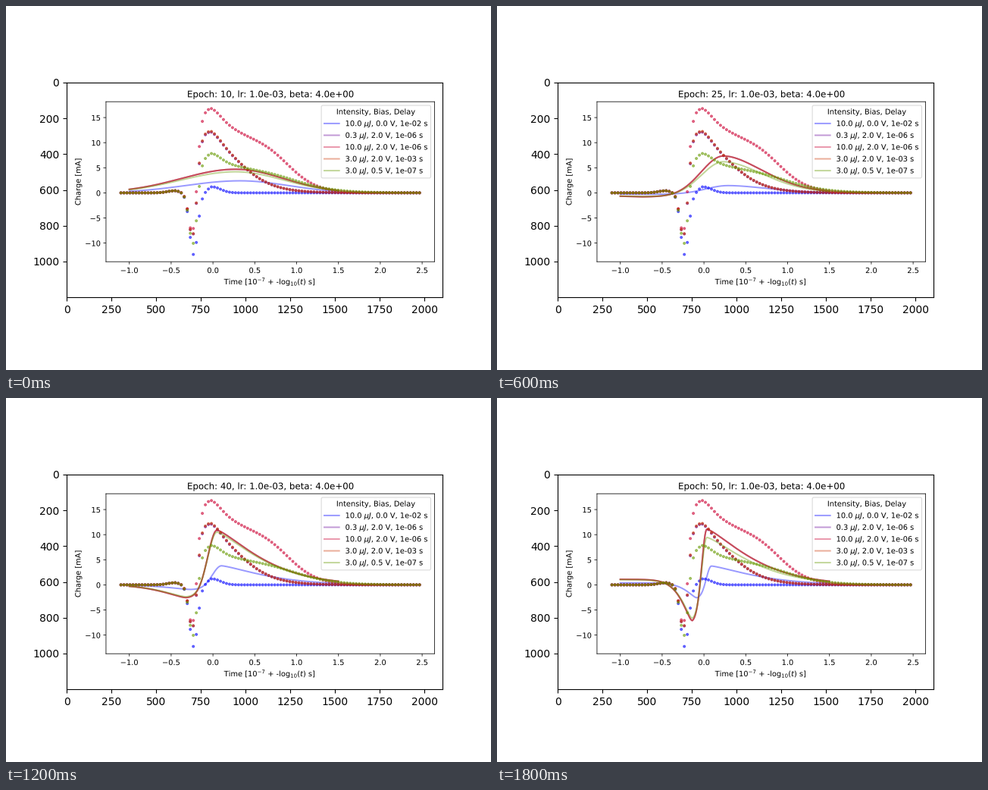
Animation, 640 px wide and 480 px high, one loop 2 s. Source, as a matplotlib script:

```python
import matplotlib.pyplot as plt
import numpy as np
from matplotlib.animation import FuncAnimation
from matplotlib.patches import FancyBboxPatch
from matplotlib.patheffects import Normal

W, H, DPI = 640, 480, 100
S = 496 / 700                 # scale of the embedded 7 x 4 inch plot
LEFT, RIGHT, TOP, BOTTOM = 131.95, 565.37, 126.2, 337.2
X0, PER_T = 273.1, 110.4      # stage pixels of t = 0 and per unit of t
Y0, PER_MA = 246.4, 6.62      # stage pixels of 0 mA and per mA
LINE = dict(alpha=.4, lw=2 * S)

COLORS = [(0, 0, 1), (.4, 0, .6), (.8, 0, .2), (.8, .2, 0), (.4, .6, 0)]
LABELS = [r"10.0 $\mu J$, 0.0 V, 1e-02 s", r"0.3 $\mu J$, 2.0 V, 1e-06 s",
          r"10.0 $\mu J$, 2.0 V, 1e-06 s", r"3.0 $\mu J$, 2.0 V, 1e-03 s",
          r"3.0 $\mu J$, 0.5 V, 1e-07 s"]


def hump(x, center, left, right):
    return np.exp(-.5 * ((x - center) / np.where(x < center, left, right)) ** 2)


def sigmoid(x):
    return 1 / (1 + np.exp(-x))


# Measured dots: a dip shared by all, then a decaying response.
N = np.arange(100)
DOT_X = np.linspace(LEFT + 19.7, RIGHT - 19.7, N.size)


def dots(shoulder=0, end=40, width=6, spike=0):
    common = (.42 * hump(N, 18, 2.5, 1.2) - 12.3 * hump(N, 24.1, 1.36, 1.36)
              + 1.2 * hump(N, 30.2, 1.3, 2.8))
    rise = sigmoid((N - 24.6) / .8)
    decay = (shoulder * sigmoid((end - N) / width)
             + spike * hump(N, 26, 7.7, 7.7))
    return common + rise * decay


DOTS = [dots(), dots(14.1, 37.5, 6.1), dots(11.5, 55.1, 5, 4.8),
        dots(14.3, 37.5, 6.1), dots(5.2, 57, 7, 1.8)]

# Fitted lines: key values over the epochs, interpolated in between.
FIT_X = np.linspace(X0 - PER_T, X0 + 1.5 * PER_T, 300)
EPOCHS = [*range(10, 50, 5), 5, 50]
KEY_EPOCHS = [5, 10, 15, 25, 30, 40, 45, 50]
KEYS = dict(
    peak_x=[345, 303, 313, 299, 285, 278.5, 278, 277],
    red=[2, 4.7, 6.65, 7.35, 8.25, 10.9, 12.3, 11.1],
    blue=[2, 2.4, 1.9, 1.45, 2.1, 3.8, 4.55, 3.75],
    olive=[2, 4.2, 4.4, 6.2, 7.8, 10.5, 11.8, 9.45],
    start=[0, 0, 0, -.55, -.95, .1, .8, 1.1],
    dip=[0, 0, 0, .8, 2.1, 2.6, 5.4, 7.5],
    dip_x=[190, 190, 190, 190, 208, 238, 257, 258],
    dip_w=[35, 35, 35, 35, 35, 46, 34, 19])


def fit(epoch, name, gain=1, shift=0):
    """Slow fall into a dip, steep rise to a peak, long tail."""
    k = {key: np.interp(epoch, KEY_EPOCHS, v) for key, v in KEYS.items()}
    x = FIT_X - shift
    start, dip, peak = gain * k["start"], gain * k["dip"], k[name]
    before = np.maximum(k["dip_x"] - x, 0) / k["dip_w"]
    base = start - (start + dip) * np.exp(-before ** 1.35)

    rise_w = 72 * np.exp((10 - epoch) / 17)
    rise = hump(x, k["peak_x"], rise_w, rise_w)

    tail_w = 75 + 77 * np.exp((5 - epoch) / 3)
    power = 1.3 + .7 * sigmoid((28 - epoch) / 3)
    after = np.maximum(x - k["peak_x"], 0) / tail_w
    return np.where(x < k["peak_x"], base + (peak - base) * rise,
                    peak * np.exp(-after ** power))


def fits(epoch):
    red = fit(epoch, "red")
    blue = fit(epoch, "blue", .36, 6 * (epoch > 5))
    return [blue, red, red, red, fit(epoch, "olive", .93)]


def to_y(charge):
    return Y0 - PER_MA * charge


fig = plt.figure(figsize=(W / DPI, H / DPI), dpi=DPI)

# Outer axes: pixel rulers around a 2100 x 1200 picture.
outer = fig.add_subplot()
outer.set(xlim=(-.5, 2099.5), ylim=(1199.5, -.5), aspect="equal",
          xticks=range(0, 2001, 250), yticks=range(0, 1001, 200))

# Inner axes: coordinates are stage pixels.
ax = fig.add_axes([LEFT / W, 1 - BOTTOM / H,
                   (RIGHT - LEFT) / W, (BOTTOM - TOP) / H])
ax.set(xlim=(LEFT, RIGHT), ylim=(BOTTOM, TOP))
t_ticks = np.arange(-1, 2.6, .5)
ma_ticks = np.arange(-10, 16, 5)
tick_x, tick_y = X0 + PER_T * t_ticks, to_y(ma_ticks)
ax.set_xticks(tick_x, [f"{t:.1f}".replace("-", "\u2212") for t in t_ticks])
ax.set_yticks(tick_y, [str(q).replace("-", "\u2212") for q in ma_ticks])
ax.tick_params(length=0, pad=7 * S, labelsize=10 * S)
for spine in ax.spines.values():
    spine.set(linewidth=.8 * S, snap=False)
for tick_label in ax.get_xticklabels() + ax.get_yticklabels():
    tick_label.set_path_effects([Normal()])

# Tick marks as free lines, so they are not snapped to whole pixels.
TICK = dict(color="k", lw=.8 * S, snap=False, clip_on=False,
            solid_capstyle="butt")
for x in tick_x:
    ax.plot([x, x], [BOTTOM, BOTTOM + 3.45], **TICK)
for y in tick_y:
    ax.plot([LEFT - 3.45, LEFT], [y, y], **TICK)


def write(x, y, text, size=10, ha="center", **kw):
    """Unhinted text with its baseline at a stage pixel."""
    return ax.text(x, y, text, fontsize=size * S, ha=ha, va="baseline",
                   path_effects=[Normal()], zorder=6, **kw)


mid_x, mid_y = (LEFT + RIGHT) / 2, (TOP + BOTTOM) / 2
title = write(mid_x, 120.3, "", 12)
write(mid_x, 367.1, r"Time [$10^{-7}$ + -log$_{10}$($t$) s]")
write(98.4, mid_y, "Charge [mA]", rotation=90, rotation_mode="anchor")

lines = []
for color, charge in zip(COLORS, DOTS):
    lines += ax.plot(FIT_X, to_y(0 * FIT_X), color=color, **LINE)
    ax.plot(DOT_X, to_y(charge), ".", color=color, alpha=.55, ms=6 * S, mew=S,
            path_effects=[Normal()])

# Legend.
ax.add_patch(FancyBboxPatch((416.1, 131.1), 144.4, 95.8,
                            boxstyle="round,pad=0,rounding_size=1.97",
                            fc=(1, 1, 1, .8), ec=(.8, .8, .8, .8), lw=S,
                            zorder=5))
write(488.3, 142.8, "Intensity, Bias, Delay")
for row, (color, label) in enumerate(zip(COLORS, LABELS)):
    y = 154.9 + 15.55 * row
    ax.plot([420, 439.7], [y, y], color=color, snap=False, zorder=6, **LINE)
    write(447.6, y + 3.45, label, ha="left")


def update(i):
    epoch = EPOCHS[i]
    title.set_text(f"Epoch: {epoch}, lr: 1.0e-03, beta: 4.0e+00")
    for line, charge in zip(lines, fits(epoch)):
        line.set_ydata(to_y(charge))
    return [title, *lines]


anim = FuncAnimation(fig, update, frames=len(EPOCHS), interval=200,
                     repeat=True, repeat_delay=0)
plt.show()
```
